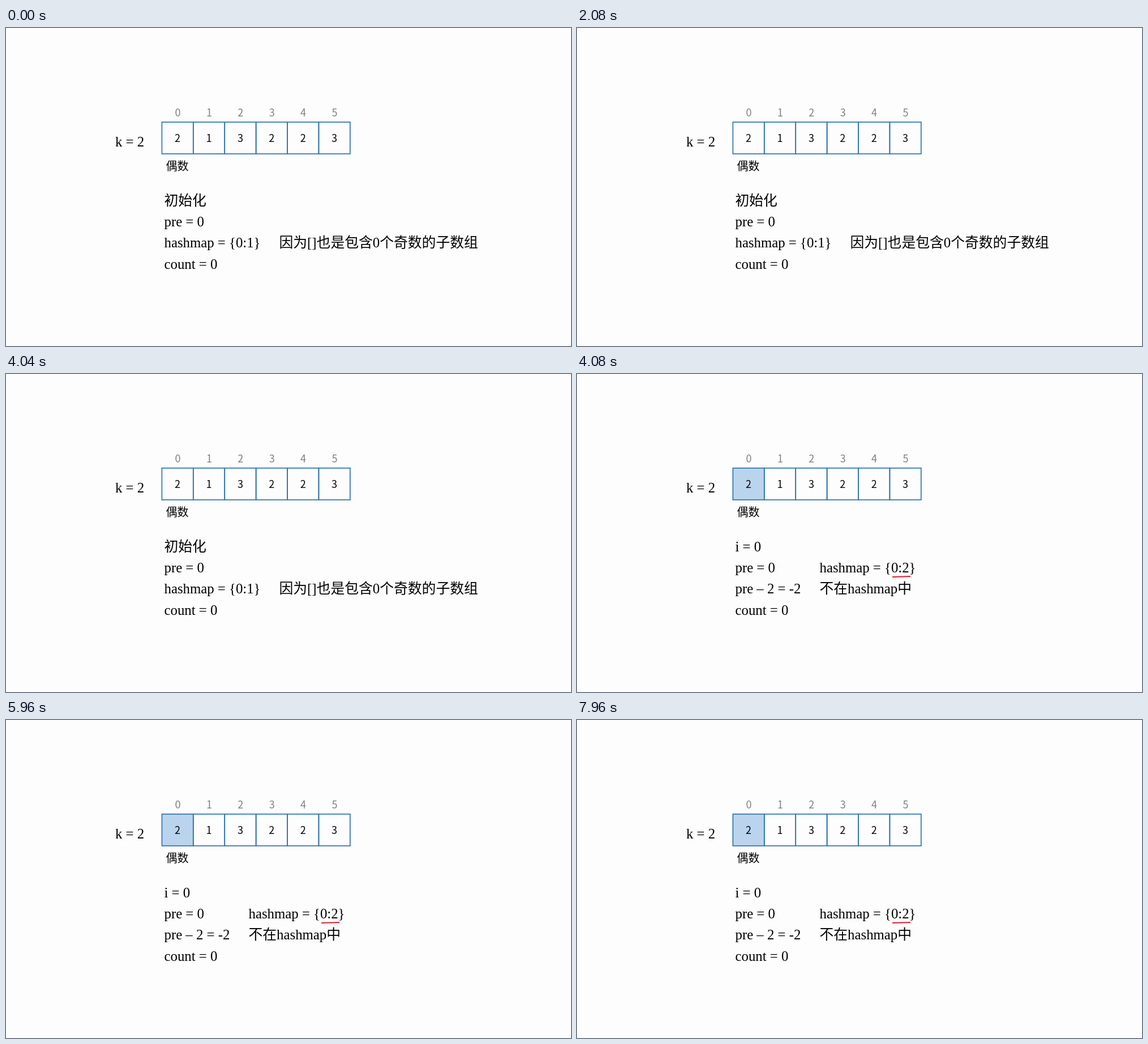
An HTML page for the animation above (8000 ms loop, 998 by 561 pixels).

```html
<!DOCTYPE html>
<html lang="zh-CN">
<head>
<meta charset="utf-8">
<title>Prefix count of odd numbers</title>
<style>
  html, body { margin: 0; width: 100%; height: 100%; overflow: hidden; background: #fdfdfd; }
  svg { display: block; width: 100%; height: 100%; }
  text { font: 24.8px "Liberation Serif", "Noto Sans CJK SC", "Noto Sans CJK", serif; }
  .digit { font: 300 18px "Noto Sans CJK SC", "Noto Sans CJK", sans-serif; text-anchor: middle; }
  .index { fill: #7f7f7f; }
  .label { font: 300 20px "Noto Sans CJK SC", "Noto Sans CJK", sans-serif; }
  .cell { fill: none; stroke: #2e74b0; stroke-width: 1.7; }
</style>
</head>
<body>
<svg id="stage" viewBox="0 0 998 561"></svg>
<script>
const LOOP = 8000, SWITCH = 4080;
const values = [2, 1, 3, 2, 2, 3];
const left = 275.4, top_ = 166, pitch = 55.4, size = 56;

const text = (x, y, content, cls = "") => `<text x="${x}" y="${y}" class="${cls}">${content}</text>`;
const lines = (x, firstRow, rows) =>
  rows.map((row, i) => text(x, 312.6 + 37.4 * (firstRow + i), row)).join("");

const cells = values.map((value, i) => {
  const x = left + i * pitch, mid = x + pitch / 2;
  return `<rect class="cell" x="${x}" y="${top_}" width="${pitch}" height="${size}"/>`
    + text(mid, 201, value, "digit")
    + text(mid + 0.4, 155.5, i, "digit index");
}).join("");

const steps = [
  lines(279.5, 0, ["初始化", "pre = 0", "hashmap = {0:1}", "count = 0"])
    + lines(482.5, 2, ["因为[]也是包含0个奇数的子数组"]),
  lines(279.5, 0, ["i = 0", "pre = 0", "pre – 2 = -2", "count = 0"])
    + lines(428.5, 1, ["hashmap = {0:2}", "不在hashmap中"])
    + `<path d="M557 358L589 357" stroke="#e3182d" stroke-width="1.8"/>`
];

document.getElementById("stage").innerHTML =
  `<rect id="highlight" x="${left}" y="${top_}" width="${pitch}" height="${size}" fill="#bad4ee"/>`
  + cells + text(193, 209, "k = 2") + text(282.5, 250.5, "偶数", "label")
  + steps.map(step => `<g class="step">${step}</g>`).join("");

const highlight = document.getElementById("highlight");
const groups = document.querySelectorAll(".step");
const show = (node, on) => node.setAttribute("visibility", on ? "visible" : "hidden");
const start = performance.now();

function draw() {
  const current = (performance.now() - start) % LOOP < SWITCH ? 0 : 1;
  groups.forEach((group, i) => show(group, i === current));
  show(highlight, current === 1);
  requestAnimationFrame(draw);
}
draw();
</script>
</body>
</html>
```
